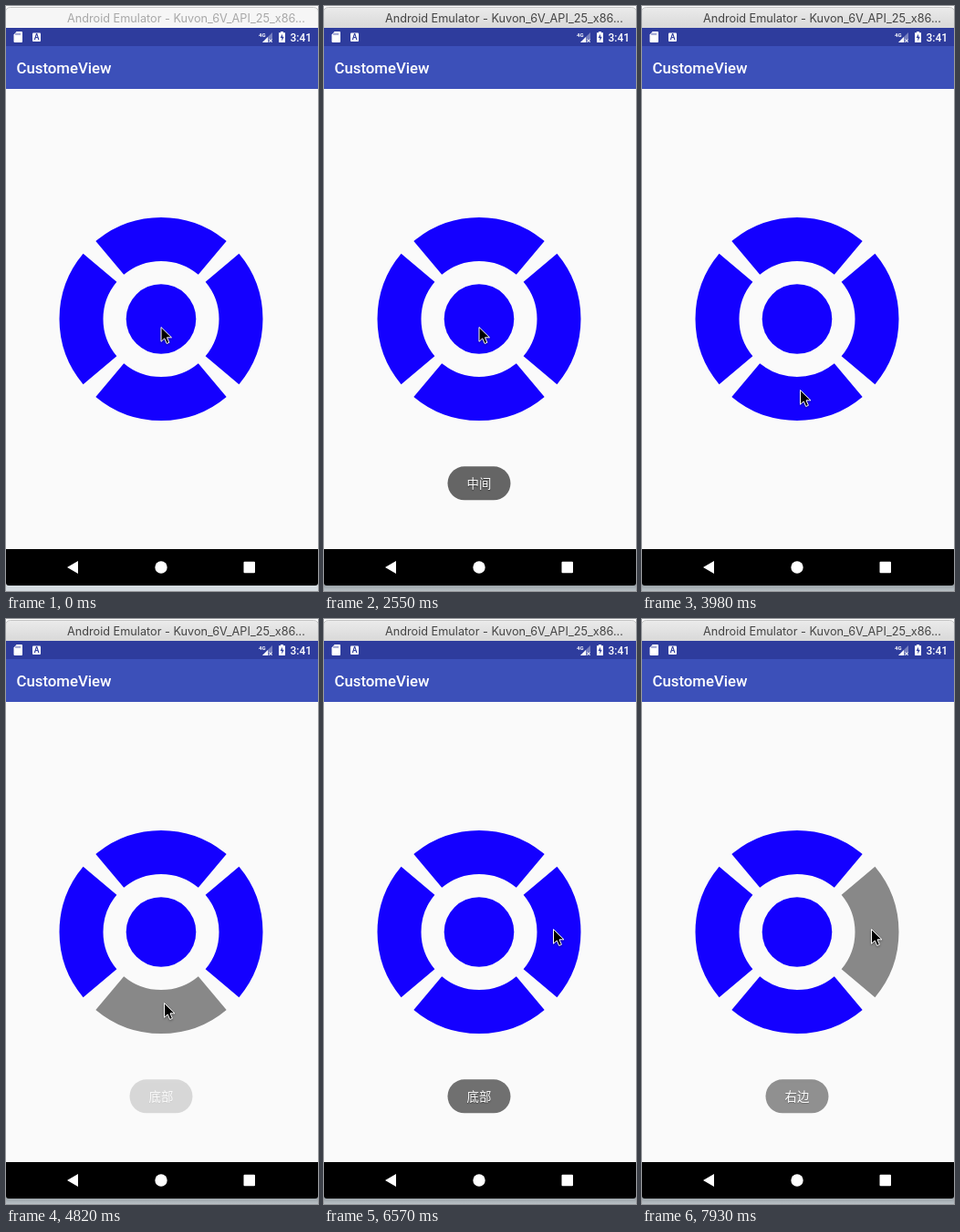
These frames come from a looping animation (342x642 px, 7990 ms). An HTML page:

```html
<!DOCTYPE html>
<html lang="en">
<head>
<meta charset="utf-8">
<title>Emulator remote pad</title>
<style>
  html, body { margin: 0; height: 100%; overflow: hidden; background: #fff; }
  svg { display: block; width: 342px; height: 642px; }
  text { font-family: Roboto, sans-serif; fill: #fff; }
  #caption { font: 12.7px Inter, sans-serif; fill: #444; }
  .inactive #caption { fill: #a8a8a8; }
  .inactive #titleBar { fill: #f6f6f6; }
  .inactive #shadow { fill: #d5dce1; }
  #ring path { fill: none; stroke: #1400ff; stroke-width: 48; }
  #middle { fill: #1400ff; }
  #ring path.pressed { stroke: #888; }
  #middle.pressed { fill: #888; }
  #label { font: 13.4px "Noto Sans CJK SC", "Noto Sans CJK", sans-serif; text-shadow: 0 1px 1px #333; }
</style>
</head>
<body>
<svg id="stage" viewBox="0 0 342 642">
  <defs>
    <linearGradient id="metal" x2="0" y2="1">
      <stop stop-color="#ebebeb"/><stop offset="1" stop-color="#d2d2d2"/>
    </linearGradient>
    <linearGradient id="shade" x2="0" y2="1">
      <stop stop-color="#7f878d"/><stop offset="1" stop-color="#b9c1c6"/>
    </linearGradient>
  </defs>

  <rect id="shadow" y="630" width="342" height="12" fill="url(#shade)"/>
  <rect id="titleBar" x="-.5" y="1.5" width="343" height="30" rx="5" fill="url(#metal)" stroke="#c4c4c4"/>
  <text id="caption" x="67" y="18">Android Emulator - Kuvon_6V_API_25_x86...</text>

  <rect y="24" width="342" height="20" fill="#2e3c9d"/>
  <rect y="44" width="342" height="47" fill="#3c50b9"/>
  <rect y="91" width="342" height="505" fill="#fafafa"/>
  <path d="M0 596H342V633Q342 636 339 636H3Q0 636 0 633Z"/>

  <g fill="#fff">
    <path d="M11.5 28H17Q18 28 18 29V39Q18 40 17 40H9.500Q8.500 40 8.500 39V31.500Z"/>
    <rect x="29" y="29.500" width="9" height="9.500" rx="1"/>
    <path d="M292 29V40H281Z" opacity=".35"/>
    <path d="M287 34V40H281Z"/>
    <path d="M288.500 36.500l3 3m0-3l-3 3" stroke="#fff"/>
    <path d="M301 28h3v1.300h2V40h-7V29.300h2Z"/>
    <path d="M67 616L79 609V623Z"/>
    <circle cx="170" cy="616" r="6.700"/>
    <rect x="260.500" y="609.800" width="12.500" height="12.500" rx="1"/>
  </g>
  <path d="M303 30.500l-2.300 4.500h1.700v3.500l2.300-4.700h-1.700Z" fill="#2e3c9d"/>
  <path d="M11 29.500v2.500m2-2.500v2.500m2-2.500v2.500" stroke="#2e3c9d" stroke-width=".8"/>
  <text x="33.500" y="37.300" font-size="8.500" font-weight="700" text-anchor="middle" style="fill:#2e3c9d">A</text>
  <text x="277" y="33.500" font-size="6" font-weight="700">4G</text>
  <text x="311.500" y="38.500" font-size="12" font-weight="500">3:41</text>
  <text x="11.500" y="74" font-size="16.800" font-weight="500">CustomeView</text>

  <g id="ring" transform="translate(170 343.500)"></g>
  <circle id="middle" cx="170" cy="343.500" r="38.300"/>

  <g id="toast">
    <rect x="135.500" y="505.300" width="69" height="37" rx="18.500" fill="#656565"/>
    <text id="label" x="170" y="529" text-anchor="middle"></text>
  </g>

  <g id="cursor">
    <path d="M0 .5V16.300L3.700 12.900 6.200 18.500 8.900 17.300 6.500 11.800H11.500Z"
      stroke="#fff" stroke-linejoin="round" style="filter:drop-shadow(0 1px 1px #0006)"/>
  </g>
</svg>

<script>
const LOOP = 7990, FADE = 500;
const $ = id => document.getElementById(id);

// Four 80° arcs: top, right, bottom, left
$('ring').innerHTML = [0, 90, 180, 270].map(angle =>
  `<path d="M-56.240 -67.030A87.500 87.500 0 0 1 56.240 -67.030" transform="rotate(${angle})"/>`).join('');
const [, right, bottom] = $('ring').children;

const presses = [
  { part: $('middle'), from: 1860, to: 2330 },
  { part: bottom, from: 4760, to: 5400 },
  { part: right, from: 7690, to: LOOP }
];
const toasts = [
  { text: '中间', show: 2075, hide: 3475 },
  { text: '底部', show: 4760, hide: 6435 },
  { text: '右边', show: 7700, hide: LOOP }
];
const moves = [
  { from: 2740, to: 3340, dx: 3.5, dy: 69 },
  { from: 5830, to: 6340, dx: 78, dy: -81 }
];

const progress = (t, start, length) => Math.min(1, Math.max(0, (t - start) / length));
const smooth = p => p * p * (3 - 2 * p);

function draw(t) {
  $('stage').classList.toggle('inactive', t < 120);

  for (const { part, from, to } of presses)
    part.classList.toggle('pressed', t >= from && t < to);

  const toast = toasts.findLast(item => t >= item.show);
  let opacity = 0;
  if (toast) {
    const fadeIn = 1 - (1 - progress(t, toast.show, FADE)) ** 2;
    opacity = fadeIn * (1 - progress(t, toast.hide, FADE) ** 2);
    $('label').textContent = toast.text;
  }
  $('toast').setAttribute('opacity', opacity);

  let x = 170, y = 352;
  for (const { from, to, dx, dy } of moves) {
    const p = smooth(progress(t, from, to - from));
    x += dx * p;
    y += dy * p;
  }
  $('cursor').setAttribute('transform', `translate(${x} ${y})`);
}

const start = performance.now();
function tick() {
  draw((performance.now() - start) % LOOP);
  requestAnimationFrame(tick);
}
tick();
</script>
</body>
</html>
```
